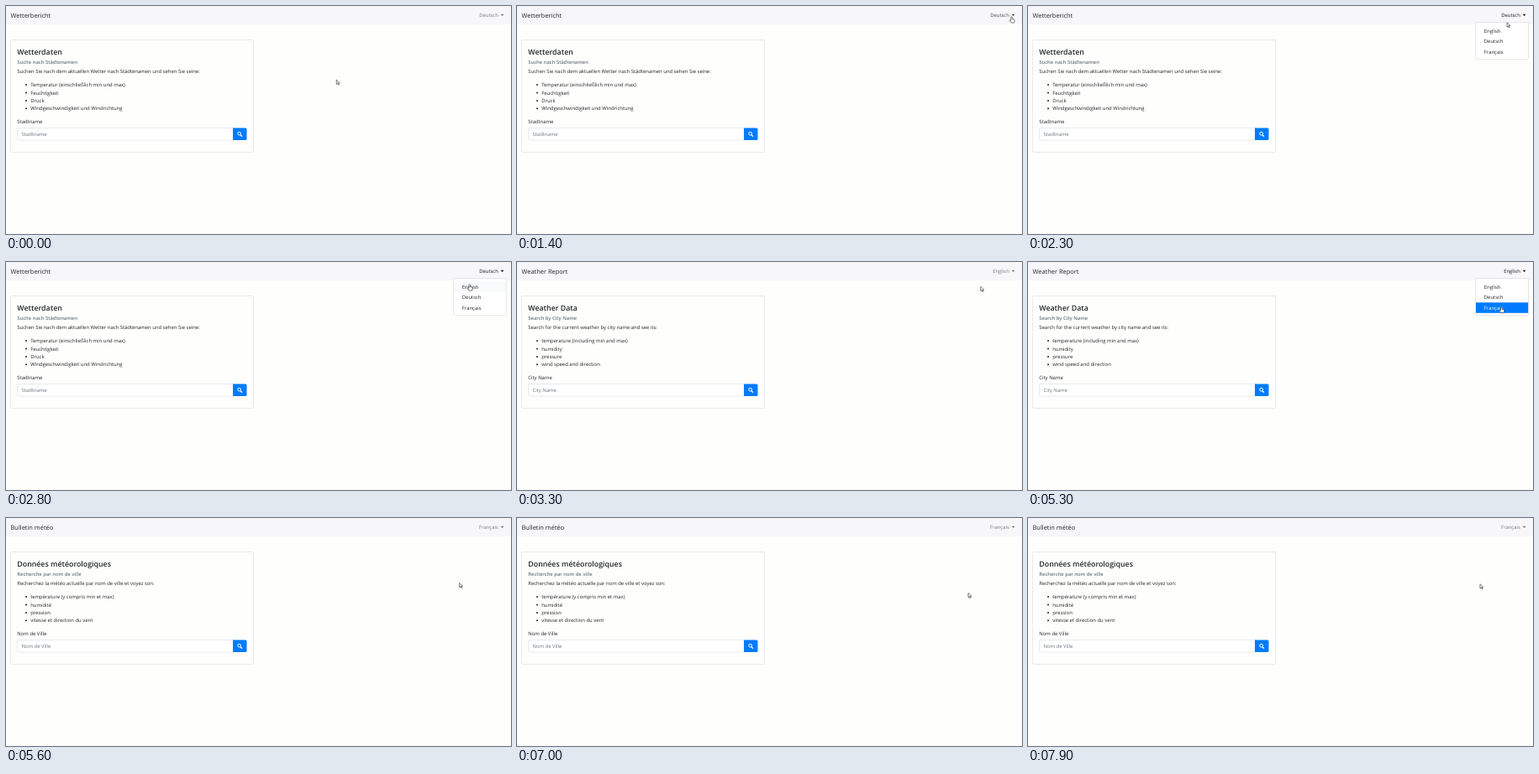
These frames come from a looping animation (601x272 px, 8000 ms). An HTML page:

```html
<!DOCTYPE html>
<html lang="de">
<head>
<meta charset="utf-8">
<title>Wetterbericht</title>
<style>
html, body { margin: 0; width: 100%; height: 100%; overflow: hidden; background: #fefefc; }
svg { display: block; width: 601px; height: 272px; }
text { font: 5.93px "Open Sans", "Noto Sans", sans-serif; fill: #212529; text-rendering: geometricPrecision; }
#brand { font-size: 7.45px; }
#title { font-size: 8.8px; font-weight: 600; }
#sub { font-size: 5.85px; font-weight: 600; fill: #6c757d; }
#hint { fill: #6c757d; }
#lang { text-anchor: end; }
.cursor { fill: #fff; stroke: #222; stroke-width: .6; stroke-linejoin: round; }
</style>
</head>
<body>
<svg viewBox="0 0 601 272">
  <rect width="601" height="21.9" fill="#f7f7fa"/>
  <text id="brand" x="5.5" y="14"/>
  <g id="label">
    <text id="lang" x="585.8" y="13.3"/>
    <path d="M588.6 9.8h4l-2 2.1z"/>
  </g>

  <rect x="5.5" y="40.5" width="289" height="134" rx="1.5" fill="none" stroke="#e6e6e4" stroke-width=".8"/>
  <text id="title" x="13.3" y="58"/>
  <text id="sub" x="13.3" y="68.8"/>
  <text id="intro" x="13.3" y="80.3"/>
  <g id="list"></g>
  <text id="field" x="13.3" y="140"/>
  <rect x="13.5" y="145.6" width="257" height="14.4" rx="1.5" fill="#fff" stroke="#d6dade" stroke-width=".6"/>
  <text id="hint" x="18.5" y="155.3"/>
  <path d="M270 145.4h15a1.5 1.5 0 0 1 1.5 1.5v11.7a1.5 1.5 0 0 1-1.5 1.5h-15z" fill="#007bff"/>
  <g fill="none" stroke="#fff">
    <circle cx="277.6" cy="152.2" r="1.9" stroke-width="1"/>
    <path d="M279 153.7l2 2" stroke-width="1.3"/>
  </g>

  <g id="menu">
    <rect x="532.7" y="19.6" width="62.8" height="44.1" rx="1.5" fill="#fff" stroke="#dcdcdc" stroke-width=".7"/>
    <rect id="mark" x="533" width="62.2" height="12.5"/>
  </g>

  <path id="arrow" class="cursor" d="M0 0v5.3l1.3-1.2.9 2 .9-.4-.9-1.9h1.7z"/>
  <path id="hand" class="cursor" d="M-.7.5q.7-1 1.4 0v2.3l2.2.5q.8.3.7 1.2l-.5 2.7h-3.6l-2-2.6q.2-1.1 1.8 0z"/>
</svg>
<script>
const $ = id => document.getElementById(id);
const names = ["English", "Deutsch", "Français"];
const pages = [
  { brand: "Weather Report", title: "Weather Data", sub: "Search by City Name",
    intro: "Search for the current weather by city name and see its:", field: "City Name",
    list: ["temperature (including min and max)", "humidity", "pressure", "wind speed and direction"] },
  { brand: "Wetterbericht", title: "Wetterdaten", sub: "Suche nach Städtenamen",
    intro: "Suchen Sie nach dem aktuellen Wetter nach Städtenamen und sehen Sie seine:", field: "Stadtname",
    list: ["Temperatur (einschließlich min und max)", "Feuchtigkeit", "Druck", "Windgeschwindigkeit und Windrichtung"] },
  { brand: "Bulletin météo", title: "Données météorologiques", sub: "Recherche par nom de ville",
    intro: "Recherchez la météo actuelle par nom de ville et voyez son:", field: "Nom de Ville",
    list: ["température (y compris min et max)", "humidité", "pression", "vitesse et direction du vent"] }
];

// pointer path: time, x, y
const path = [
  [0, 393.3, 88], [600, 393.3, 88], [800, 533.5, 72], [900, 533.5, 72],
  [1400, 588.6, 12.7], [1900, 588.6, 12.7], [2700, 551.6, 26.8], [3100, 551.6, 26.8],
  [3500, 552, 32], [4000, 552, 32], [4400, 576.4, 11.6], [4700, 576.4, 11.6],
  [5300, 563.2, 53.4], [5500, 563, 53.4], [5600, 539.6, 77.5], [5800, 537, 89.5],
  [7100, 537, 89.5], [7900, 538, 78.8], [8000, 538, 78.8]
];
const rowTop = i => 23.3 + 12.5 * i;

function add(parent, tag, attrs, text = "") {
  const el = document.createElementNS("http://www.w3.org/2000/svg", tag);
  for (const k in attrs) el.setAttribute(k, attrs[k]);
  el.textContent = text;
  return parent.appendChild(el);
}

const lines = pages[0].list.map((_, i) => {
  const y = 96.1 + 9.4 * i;
  add($("list"), "circle", { cx: 24, cy: y - 2, r: 1, fill: "#212529" });
  return add($("list"), "text", { x: 29.2, y });
});
const rows = names.map((name, i) => add($("menu"), "text", { x: 542.8, y: rowTop(i) + 8.4 }, name));

function pointer(t) {
  const i = path.findIndex(p => p[0] > t);
  const [a, b] = [path[i - 1], path[i]];
  const k = (t - a[0]) / (b[0] - a[0]);
  return [a[1] + (b[1] - a[1]) * k, a[2] + (b[2] - a[2]) * k];
}

let shown = -1;
function setPage(n) {
  if (n === shown) return;
  shown = n;
  const page = pages[n];
  for (const id of ["brand", "title", "sub", "intro", "field"]) $(id).textContent = page[id];
  $("hint").textContent = page.field;
  $("lang").textContent = names[n];
  lines.forEach((line, i) => line.textContent = page.list[i]);
}

const show = (id, on) => $(id).style.display = on ? "" : "none";
const within = (t, a, b) => t >= a && t < b;

function draw(now) {
  const t = Math.floor(now % 8000 / 100) * 100;
  const [x, y] = pointer(t);
  const open = within(t, 1900, 3100) || within(t, 4700, 5600);
  const pressed = within(t, 2900, 3100) || within(t, 5300, 5600);
  const onLabel = x > 560 && y < 18;
  const row = open ? Math.floor((y - rowTop(0)) / 12.5) : -1;
  const onRow = row >= 0 && row < 3;

  setPage(t < 3100 ? 1 : t < 5600 ? 0 : 2);
  const shade = `rgba(0,0,0,${open ? .9 : onLabel ? .7 : .5})`;
  $("lang").style.fill = shade;
  $("label").style.fill = shade;

  show("menu", open);
  show("mark", onRow);
  $("mark").setAttribute("y", rowTop(onRow ? row : 0));
  $("mark").style.fill = pressed ? "#007bff" : "#f8f9fa";
  rows.forEach((el, i) => el.style.fill = pressed && i === row ? "#fff" : "#212529");

  const hand = onLabel || onRow;
  show("hand", hand);
  show("arrow", !hand);
  $(hand ? "hand" : "arrow").setAttribute("transform", `translate(${x} ${y})`);
}

const start = performance.now();
function tick() {
  draw(performance.now() - start);
  requestAnimationFrame(tick);
}
tick();
</script>
</body>
</html>
```
